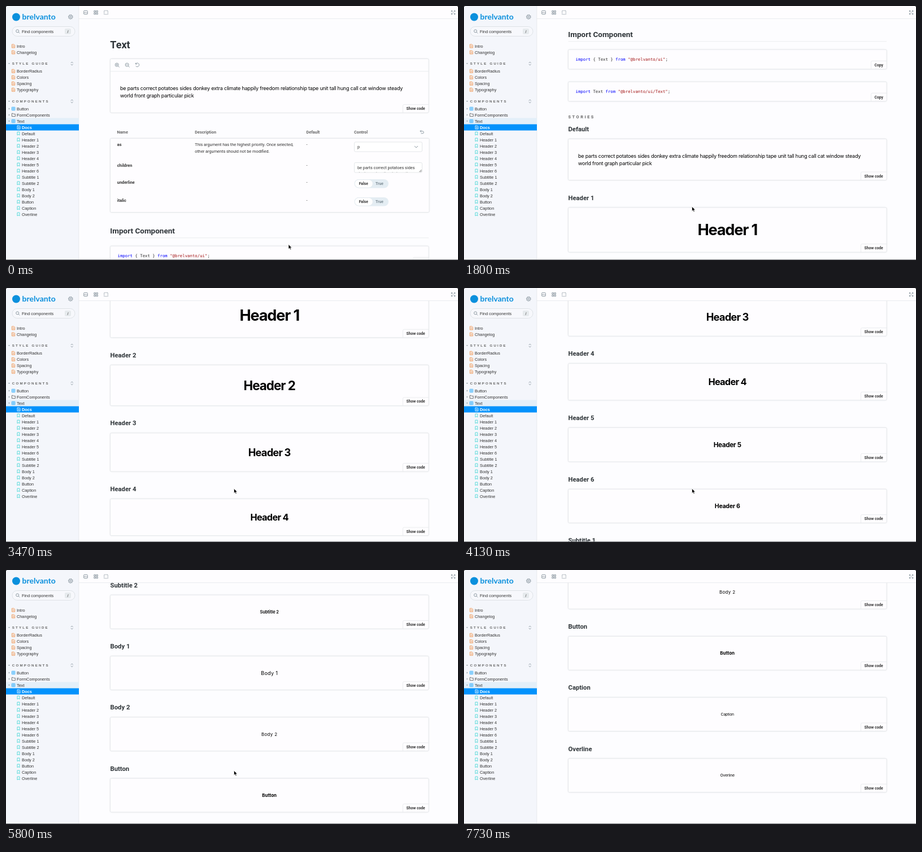
Write an HTML page that moves like this. It is 800x450 px and loops after 7.8 s.

```html
<!DOCTYPE html>
<html lang="en">
<head>
<meta charset="utf-8">
<title>Text docs</title>
<style>
  html, body { margin: 0; width: 100%; height: 100%; overflow: hidden; background: #fdfdff; }
  svg { display: block; width: 800px; height: 450px; }
  text { white-space: pre; }
  .side { font: 7.33px "Liberation Sans", sans-serif; fill: #333; }
  .sect { font: bold 6.2px "Liberation Sans", sans-serif; letter-spacing: .35em; fill: #666; }
  .logo { font: bold 14px Lato, sans-serif; fill: #0b90dd; }
  .doc { font: 7.33px Roboto, sans-serif; fill: #333; }
  .bold { font: bold 7.33px Roboto, sans-serif; fill: #333; }
  .head { fill: #666; }
  .small { font: bold 6.76px Roboto, sans-serif; fill: #333; }
  .h1 { font: bold 18.04px Roboto, sans-serif; fill: #2e3438; }
  .h2 { font: bold 13.53px Roboto, sans-serif; fill: #2e3438; }
  .h3 { font: bold 11.27px Roboto, sans-serif; fill: #2e3438; }
  .over { font: bold 7.33px Roboto, sans-serif; letter-spacing: .35em; fill: #666; }
  .code { font: 7.33px "DejaVu Sans Mono", monospace; fill: #333; }
  .kw { fill: #00f; }
  .str { fill: #a31515; }
  .demo { font-family: Inter, sans-serif; fill: #000; }
  .p { font-size: 9.02px; letter-spacing: -.0235em; }
  .card { fill: #fefdff; stroke: #dfe2e5; stroke-width: .7; filter: drop-shadow(0 .7px 1px rgba(0,0,0,.09)); }
  .line { fill: none; stroke: #e3e5e8; stroke-width: .7; }
  .icon { fill: none; stroke: #73828c; stroke-width: .8; }
</style>
</head>
<body>
<svg id="stage" viewBox="0 0 800 450" xmlns="http://www.w3.org/2000/svg"></svg>
<script>
const LOOP = 7800, FPS = 15, CURSOR_END = 6860;
const WORDS = ["be parts correct potatoes sides donkey extra climate happily freedom relationship tape unit tall hung call cat window steady",
  "world front graph particular pick"];

const text = (x, y, cls, s, extra = "") => `<text x="${x}" y="${y}" class="${cls}" ${extra}>${s}</text>`;
const path = (d, cls = "icon", extra = "") => `<path d="${d}" class="${cls}" ${extra}/>`;
const rect = (x, y, w, h, extra) => `<rect x="${x}" y="${y}" width="${w}" height="${h}" ${extra}/>`;
const at = (x, y, s) => `<g transform="translate(${x} ${y})">${s}</g>`;
const card = (top, bottom, w = 563.5) => rect(184.5, top, w, bottom - top, 'rx="2" class="card"');

function tag(bottom, label) {
  const w = label === "Copy" ? 27.5 : 45.5, x = 748 - w, y = bottom - 14.5;
  return path(`M${x} ${bottom}V${y + 2}q0-2 2-2H748`, "line") + text(x + 6, bottom - 5, "small", label);
}

const words = y => WORDS.map((s, i) => text(202, y + i * 13.5, "demo p", s)).join("");

// Documentation page
function codeBox(top, code) {
  return card(top, top + 34.5) + text(197.5, top + 19.6, "code", code) + tag(top + 34.5, "Copy");
}

function preview() {
  const lens = x => `<circle cx="${x}" cy="104.2" r="3"/><path d="M${x + 2.2} 106.4l2.2 2.2"/>`;
  return card(93.5, 189) + path("M184.5 115.7H748", "line") +
    `<g class="icon">${lens(196.2)}${lens(214.2)}<path d="M194.7 104.2h3m-1.5-1.5v3M212.7 104.2h3M229.8 102.2a3.3 3.3 0 1 1-.2 4M229.4 100.8v2.2h2.4"/></g>` +
    words(148.9) + tag(189, "Show code");
}

function toggle(y) {
  return rect(616.5, y - 7.8, 60.5, 15.6, 'rx="7.8" fill="#e4edf3"') +
    rect(617.2, y - 7.1, 32, 14.2, 'rx="7.1" fill="#fff" stroke="#dce3e8" stroke-width=".5"') +
    text(624.7, y + 2.4, "small", "False") +
    text(654, y + 2.4, "small", "True", 'style="fill:#7b8992"');
}

function args() {
  const heads = [[196.5, "Name"], [334.3, "Description"], [531.5, "Default"], [616, "Control"]];
  const rows = [[248.4, "as"], [285, "children"], [315, "underline"], [347, "italic"]];
  const field = (y, h) => rect(616.5, y, 120, h, 'rx="2" fill="#fff" stroke="#d9dde0" stroke-width=".7"');
  return heads.map(([x, s]) => text(x, 225.6, "bold head", s)).join("") +
    path("M735 219.8l-2 2 2 2M733.3 221.8h4a2 2 0 0 1 0 4h-2.8") +
    card(234.5, 365.5, 564.5) +
    rows.map(([y, s]) => text(196.8, y, "bold", s) + text(531.5, y, "doc", "-")).join("") +
    text(334.3, 248.4, "doc", "This argument has the highest priority. Once selected,") +
    text(334.3, 259.7, "doc", "other arguments should not be modified.") +
    field(241, 17) + text(622, 252.2, "doc", "p") + path("M723 248l3 3 3-3") +
    field(277.5, 17.5) + text(622, 288.6, "doc", "be parts correct potatoes sides") +
    `<g clip-path="url(#area)">${text(622, 298.7, "doc", "donkey extra climate happily")}</g>` +
    path("M731.5 294l4-4M733.5 294.2l2-2", "icon", 'style="stroke:#555"') +
    toggle(314.8) + toggle(346.8);
}

// label, box height, font size, weight, letter spacing
const STORIES = [
  ["Header 1", 79, 27.05, 700, "-.042em"],
  ["Header 2", 72, 22.3, 700, "-.042em"],
  ["Header 3", 68, 18.2, 700, "-.042em"],
  ["Header 4", 65, 16.3, 700, "-.042em"],
  ["Header 5", 60.4, 11.6, 700, "-.025em"],
  ["Header 6", 59.7, 10.5, 700, "-.025em"],
  ["Subtitle 1", 59.7, 8.5, 600, "-.01em"],
  ["Subtitle 2", 59.7, 7.4, 600, "-.01em"],
  ["Body 1", 59.7, 9.02, 400, ".3px"],
  ["Body 2", 59.7, 7.9, 400, ".35px"],
  ["Button", 59.7, 7.9, 700, ".05px"],
  ["Caption", 59.7, 6.77, 400, "-.2px"],
  ["Overline", 59.7, 6.77, 400, "-.18px"]
];

function stories() {
  let y = 687.5, out = "";
  for (const [name, h, size, weight, space] of STORIES) {
    const top = y + 17.6, bottom = top + h;
    out += text(184.5, y + 4, "h3", name) + card(top, bottom) +
      text(466.2, top + h / 2 + size * .364, "demo", name,
        `text-anchor="middle" style="font-size:${size}px;font-weight:${weight};letter-spacing:${space}"`) +
      tag(bottom, "Show code");
    y = bottom + 31;
  }
  return out;
}

function page() {
  const kw = s => `<tspan class="kw">${s}</tspan>`, str = s => `<tspan class="str">"${s}"</tspan>`;
  return text(184.3, 75.4, "h1", "Text") + preview() + args() +
    text(184.3, 403.2, "h2", "Import Component") + path("M184.5 410.8H748", "line") +
    codeBox(425.3, `${kw("import")} { Text } ${kw("from")} ${str("@brelvanto/ui")};`) +
    codeBox(482.3, `${kw("import")} Text ${kw("from")} ${str("@brelvanto/ui/Text")};`) +
    text(184.5, 546.6, "over", "STORIES") + text(184.5, 569.5, "h3", "Default") +
    card(583.5, 656.5) + words(616.7) + tag(656.5, "Show code") + stories();
}

// Fixed chrome
function topBar() {
  return rect(129, 0, 671, 22.5, 'fill="#fefdff"') + path("M129 22.5H800", "line") +
    `<g class="icon"><rect x="137.7" y="8.4" width="6.6" height="6.2" rx=".8"/><path d="M138 13l2-2 1.6 1.4 1-1 1.6 1.6"/>
    <path d="M155.8 8.3h2.6v2.6h-2.6zM159.8 8.3h2.6v2.6h-2.6zM155.8 12.2h2.6v2.6h-2.6zM159.8 12.2h2.6v2.6h-2.6z"/>
    <rect x="173.7" y="8.2" width="6.6" height="6.6" stroke-dasharray="1.5 .9"/>
    <path d="M788.4 10.3v-2h2M792.8 8.3h2v2M794.8 12.7v2h-2M790.4 14.7h-2v-2M788.6 8.5l2.3 2.3M794.6 8.5l-2.3 2.3M788.6 14.5l2.3-2.3M794.6 14.5l-2.3-2.3"/></g>`;
}

const sheet = (x, y, color) => at(x, y,
  path("M.5-3h3.6l1.5 1.5V3H.5zM1.8-.6h2.5M1.8 1.2h2.5", "", `fill="none" stroke="${color}" stroke-width=".8"`));
const grid = y => at(10, y,
  path("M.4-2.7h5.4v5.4H.4zM.4 0h5.4M3.1-2.7v5.4", "", 'fill="none" stroke="#1ea7fd" stroke-width=".8"'));
const mark = y => at(19.5, y,
  path("M.5-2.9h4v5.8l-2-1.5-2 1.5z", "", 'fill="none" stroke="#37d5d3" stroke-width=".8"'));
const caret = (y, open) => path(open ? `M4 ${y - .8}h3l-1.5 1.9z` : `M4.8 ${y - 1.5}v3l1.9-1.5z`, "", 'fill="#8b979f"');

function sidebar() {
  const label = (x, y, s) => text(x, y + 2.6, "side", s);
  const section = (y, s) => caret(y, true) + text(10.8, y + 2.3, "sect", s) +
    path(`M114.8 ${y - 1}l1.9-1.9 1.9 1.9M114.8 ${y + 1}l1.9 1.9 1.9-1.9`);
  const pages = [["Intro", 71], ["Changelog", 82], ["BorderRadius", 115.3], ["Colors", 126.3], ["Spacing", 137.3], ["Typography", 148.3]];
  const leaves = ["Default", ...STORIES.map(s => s[0])];
  return rect(0, 0, 129, 450, 'fill="#f4f6fb"') + path("M128.8 0V450", "line") +
    '<circle cx="18" cy="19.5" r="7" fill="#0b90dd"/>' + text(28.5, 24, "logo", "brelvanto") +
    '<circle cx="114.3" cy="19.3" r="3.3" class="icon"/><circle cx="114.3" cy="19.3" r="1.3" class="icon"/>' +
    '<circle cx="114.3" cy="19.3" r="4" class="icon" stroke-dasharray="1.2 1.94"/>' +
    rect(11, 36.5, 111, 17, 'rx="8.5" fill="#f7f8fc" stroke="#d5dade" stroke-width=".7"') +
    '<circle cx="20.2" cy="44.4" r="2.5" class="icon"/>' + path("M22 46.2l2.2 2.2") +
    label(28, 45, "Find components") + rect(104, 40, 11, 10, 'rx="2" fill="#e6eaed"') + label(108.5, 45, "/") +
    pages.map(([s, y]) => sheet(10, y, "#ef8a3c") + label(19, y, s)).join("") +
    section(102, "STYLE GUIDE") + section(168.8, "COMPONENTS") +
    rect(0, 198.5, 129, 11, 'fill="#e3eff9"') + rect(0, 209.5, 129, 11, 'fill="#0292fc"') +
    caret(182, false) + grid(182) + label(19, 182, "Button") +
    caret(193, false) + path("M10.4 190.4h2.2l.8 1h3v4.2h-6z", "icon", 'style="stroke:#555"') + label(19, 193, "FormComponents") +
    caret(204, true) + grid(204) + label(19, 204, "Text") +
    sheet(19.5, 215, "#fff") + text(28, 217.6, "side", "Docs", 'style="fill:#fff;font-weight:bold"') +
    leaves.map((s, i) => mark(226 + 11 * i) + label(28, 226 + 11 * i, s)).join("");
}

const stage = document.getElementById("stage");
stage.innerHTML = `<defs><clipPath id="area"><path d="M617 278h114v16.6h-114z"/></clipPath></defs>
  <rect width="800" height="450" fill="#fdfdff"/><g id="page">${page()}</g>${topBar()}${sidebar()}
  <path d="M0 449.5H800" stroke="#77797c"/><path d="M0 0h2.5Q0 0 0 2.5zM800 0h-2.5Q800 0 800 2.5z" fill="#222"/>
  <path id="cursor" d="M0 0v8l1.9-1.7 1.3 2.9 1.4-.6-1.3-2.8h2.5z" fill="#000" stroke="#fff" stroke-width=".6"/>`;
const pageEl = document.getElementById("page"), cursor = document.getElementById("cursor");

// Scroll: time, offset; monotone cubic between
const KNOTS = [[470, 0], [867, 76], [1300, 222], [1800, 348], [2350, 415], [2800, 430.5],
  [3450, 690], [4133, 936], [5000, 1235], [5800, 1464.8], [6350, 1640], [6800, 1716.5]];
const rise = KNOTS.slice(1).map(([t, y], i) => (y - KNOTS[i][1]) / (t - KNOTS[i][0]));
const slope = KNOTS.map((_, i) => i && rise[i] ? 2 * rise[i - 1] * rise[i] / (rise[i - 1] + rise[i]) : 0);

function scrollAt(t) {
  const last = KNOTS.length - 1;
  if (t <= KNOTS[0][0]) return 0;
  if (t >= KNOTS[last][0]) return KNOTS[last][1];
  const i = KNOTS.findIndex(k => k[0] > t) - 1;
  const [t0, y0] = KNOTS[i], [t1, y1] = KNOTS[i + 1], d = t1 - t0, u = (t - t0) / d, v = 1 - u;
  return y0 * v * v * (1 + 2 * u) + y1 * u * u * (3 - 2 * u) + d * u * v * (slope[i] * v - slope[i + 1] * u);
}

const start = performance.now();
function draw() {
  const now = (performance.now() - start) % LOOP;
  // Hold each picture for one step; the margin absorbs clock rounding
  const t = Math.floor((now + 10) * FPS / 1000) * 1000 / FPS % LOOP;
  const u = Math.min(t / 200, 1), k = u * (2 - u);
  pageEl.setAttribute("transform", `translate(0 ${-scrollAt(t).toFixed(2)})`);
  cursor.setAttribute("transform", `translate(${500 - 96.5 * k} ${422.5 - 67 * k})`);
  cursor.setAttribute("visibility", t < CURSOR_END ? "visible" : "hidden");
  requestAnimationFrame(draw);
}
draw();
</script>
</body>
</html>
```
